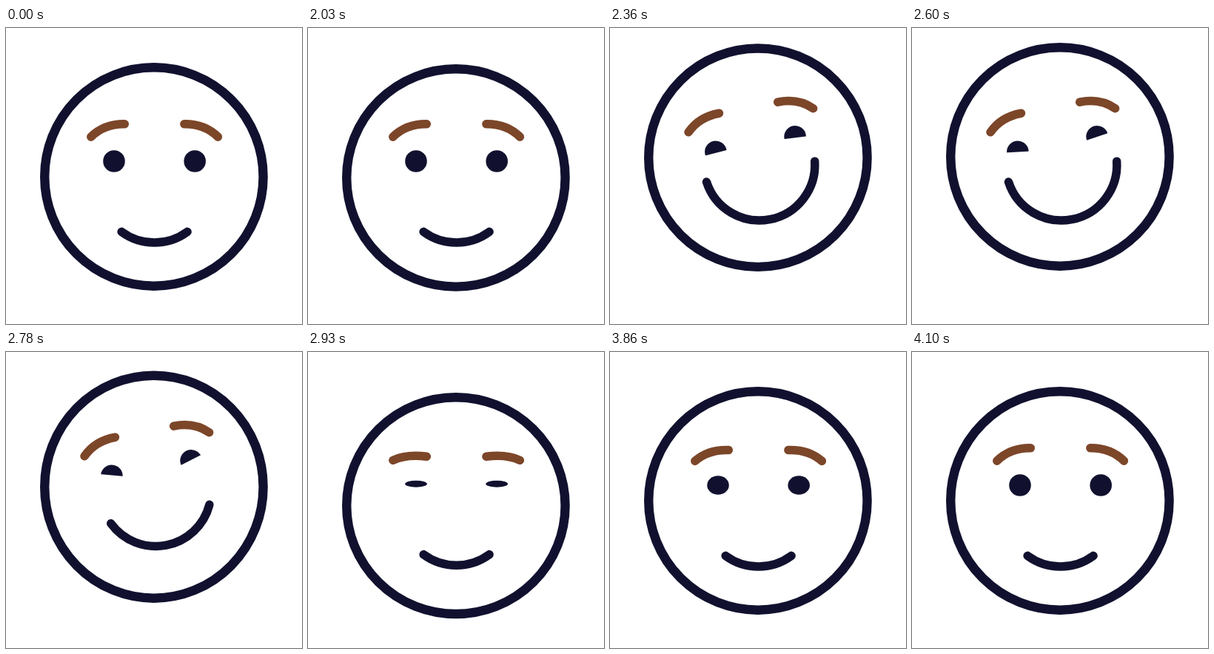
Animation of 400x400 px, one loop 5180 ms. Source, as an HTML page:

```html
<!DOCTYPE html>
<html lang="en">
<head>
<meta charset="utf-8">
<title>Smiling face</title>
<style>
  html, body { margin: 0; width: 100%; height: 100%; overflow: hidden; background: #fff; }
  svg { display: block; width: 100%; height: 100%; }
  .ink { fill: #11112f; }
  .line { fill: none; stroke: #11112f; stroke-width: 11.5; stroke-linecap: round; }
  .brow { stroke: #7c4629; }
  .lid { fill: #fff; }
</style>
</head>
<body>
<svg viewBox="0 0 400 400">
  <defs>
    <g id="side">
      <ellipse id="eye" class="ink" cx="-54.6" rx="14.8"/>
      <rect id="lid" class="lid" x="-22" width="44" height="24"/>
      <path id="brow" class="line brow"/>
    </g>
  </defs>
  <ellipse id="head" class="line" cx="199.9" rx="147.7" style="stroke-width: 12.4"/>
  <!-- face origin: the point midway between the eyes -->
  <g id="face">
    <use href="#side"/>
    <use href="#side" transform="scale(-1 1)"/>
    <path id="mouth" class="line"/>
  </g>
</svg>
<script>
const LOOP = 5180, STEP = 30, PHASE = 20;
const MOUTH_R = 75, DEG = Math.PI / 180;

const [head, face, eye, lid, brow, mouth] =
  ['head', 'face', 'eye', 'lid', 'brow', 'mouth'].map(id => document.getElementById(id));

const linear = (t, a, b) => Math.min(1, Math.max(0, (t - a) / (b - a)));
const ramp = (t, a, b) => {
  const u = linear(t, a, b);
  return u * u * (3 - 2 * u);
};
// Rises from a to b, holds, falls from c to d.
const pulse = (t, a, b, c, d) => ramp(t, a, b) - ramp(t, c, d);
const bump = (t, a, peak, b) => pulse(t, a, peak, peak, b);

function set(el, attrs) {
  for (const name in attrs) el.setAttribute(name, attrs[name]);
}

function drawHead(t, lean) {
  const rise = pulse(t, 2120, 2310, 2705, 2955);
  const dip = bump(t, 1995, 2120, 2310) + bump(t, 2705, 2955, 3125);
  const rebound = bump(t, 2955, 3125, 3230);
  const sway = lean * Math.cos(Math.PI * (t - 2360) / 180);
  const stretch = bump(t, 2705, 2780, 2930);
  set(head, {
    cy: 201 + 7.6 * dip - 26.6 * rise - 1.5 * rebound + .8 * sway,
    ry: 147.7 - 1.3 * Math.sqrt(dip) + 3.4 * stretch
  });
}

function drawEyes(t) {
  const blink = bump(t, 2030, 2130, 2240) + bump(t, 2850, 2965, 3090)
              + pulse(t, 3830, 3950, 3980, 4100);
  const squint = pulse(t, 2150, 2310, 2785, 2890);
  const turn = linear(t, 2360, 2780);
  const lidY = 24 * (1 - squint) + 1.5 - 2.3 * turn;
  set(eye, { ry: 14.8 * (1 - .9 * blink) });
  set(lid, { transform: `translate(-54.6 ${lidY}) rotate(${19.5 * turn - 3.5})` });
  set(brow, {
    d: `M-85.8 ${-32.8 + 1.2 * blink}Q-68 ${-50.5 + 13 * blink} -40.3 ${-50.2 + 17 * blink}`
  });
}

function drawMouth(t) {
  const grin = pulse(t, 2140, 2330, 2672, 2925);
  const a = (36.4 + 46.5 * grin) * DEG, cy = 35 - 6.5 * grin;
  const x = MOUTH_R * Math.sin(a), y = cy + MOUTH_R * Math.cos(a);
  set(mouth, { d: `M${-x} ${y}A${MOUTH_R} ${MOUTH_R} 0 0 0 ${x} ${y}` });
}

function draw(t) {
  const lean = pulse(t, 2120, 2310, 2785, 2920);
  const lift = 23 * pulse(t, 2120, 2310, 2785, 2960);
  set(face, { transform: `translate(${200.6 - 4.1 * lean} ${180 - lift}) rotate(${-10.8 * lean})` });
  drawHead(t, lean);
  drawEyes(t);
  drawMouth(t);
}

const start = performance.now();
function tick() {
  const t = (performance.now() - start) % LOOP;
  draw(Math.floor((t - PHASE) / STEP) * STEP + PHASE);
  requestAnimationFrame(tick);
}
tick();
</script>
</body>
</html>
```
